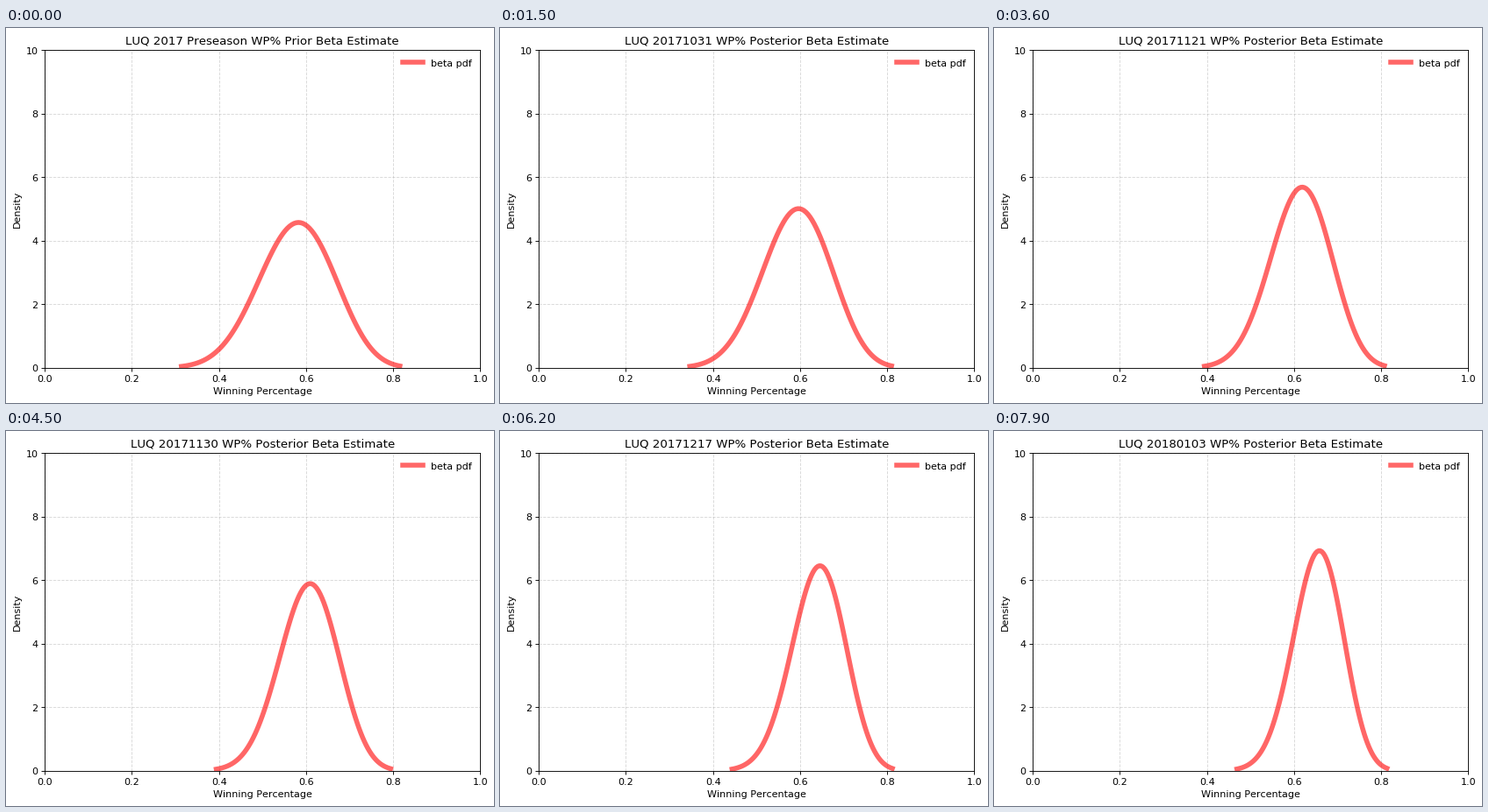
A matplotlib script for the animation above (8 s loop, 556x428 px).

```python
from math import lgamma

import numpy as np
import matplotlib.pyplot as plt
from matplotlib.animation import FuncAnimation
from matplotlib.transforms import Affine2D

W, H, DPI = 556, 428, 80
FRAMES, INTERVAL = 80, 100
TEAM = "LUQ"

# Beta prior; six games are played every thirteen days, and a few are lost
PRIOR_A, PRIOR_B = 18.77, 13.73
OPENING_EVE = np.datetime64("2017-10-16")
LOST_GAMES = (3, 4, 7, 9, 12, 17, 18, 25, 32, 33)

GRID = np.linspace(0, 1, 4001)[1:-1]

plt.rcParams["text.kerning_factor"] = 6


def beta_pdf(x, a, b):
    log_norm = lgamma(a + b) - lgamma(a) - lgamma(b)
    return np.exp(log_norm + (a - 1) * np.log(x) + (b - 1) * np.log1p(-x))


def beta_curve(a, b, tail=0.001):
    """Density between the lower and upper tail quantiles."""
    cdf = np.cumsum(beta_pdf(GRID, a, b))
    lo, hi = np.interp([tail, 1 - tail], cdf / cdf[-1], GRID)
    x = np.linspace(lo, hi, 100)
    return x, beta_pdf(x, a, b)


def record(day):
    """Games won and lost up to a day."""
    played = max(day - 1, 0) * 6 // 13
    lost = sum(game <= played for game in LOST_GAMES)
    return played - lost, lost


def title_for(day):
    if day == 0:
        return f"{TEAM} 2017 Preseason WP% Prior Beta Estimate"
    date = str(OPENING_EVE + day).replace("-", "")
    return f"{TEAM} {date} WP% Posterior Beta Estimate"


fig = plt.figure(figsize=(W / DPI, H / DPI), dpi=DPI, facecolor="white")
ax = fig.add_axes([44.28 / W, 40.2222 / H, 496 / W, 362.4 / H])
ax.set(xlim=(0, 1), ylim=(0, 10),
       xlabel="Winning Percentage", ylabel="Density")
ax.grid(linestyle="--", alpha=0.5)
line, = ax.plot([], [], "r-", lw=5, alpha=0.6, label="beta pdf")
legend = ax.legend(loc="upper right", frameon=False)
title = ax.set_title(title_for(0))

# Labels sit a fraction of a pixel below their anchors
for label in [*ax.get_yticklabels(), *legend.get_texts()]:
    label.set_transform(label.get_transform() + Affine2D().translate(0, -0.29))


def update(day):
    won, lost = record(day)
    line.set_data(*beta_curve(PRIOR_A + won, PRIOR_B + lost))
    title.set_text(title_for(day))
    return line, title


anim = FuncAnimation(fig, update, frames=FRAMES, interval=INTERVAL,
                     repeat=True, repeat_delay=0, blit=False)
plt.show()
```
